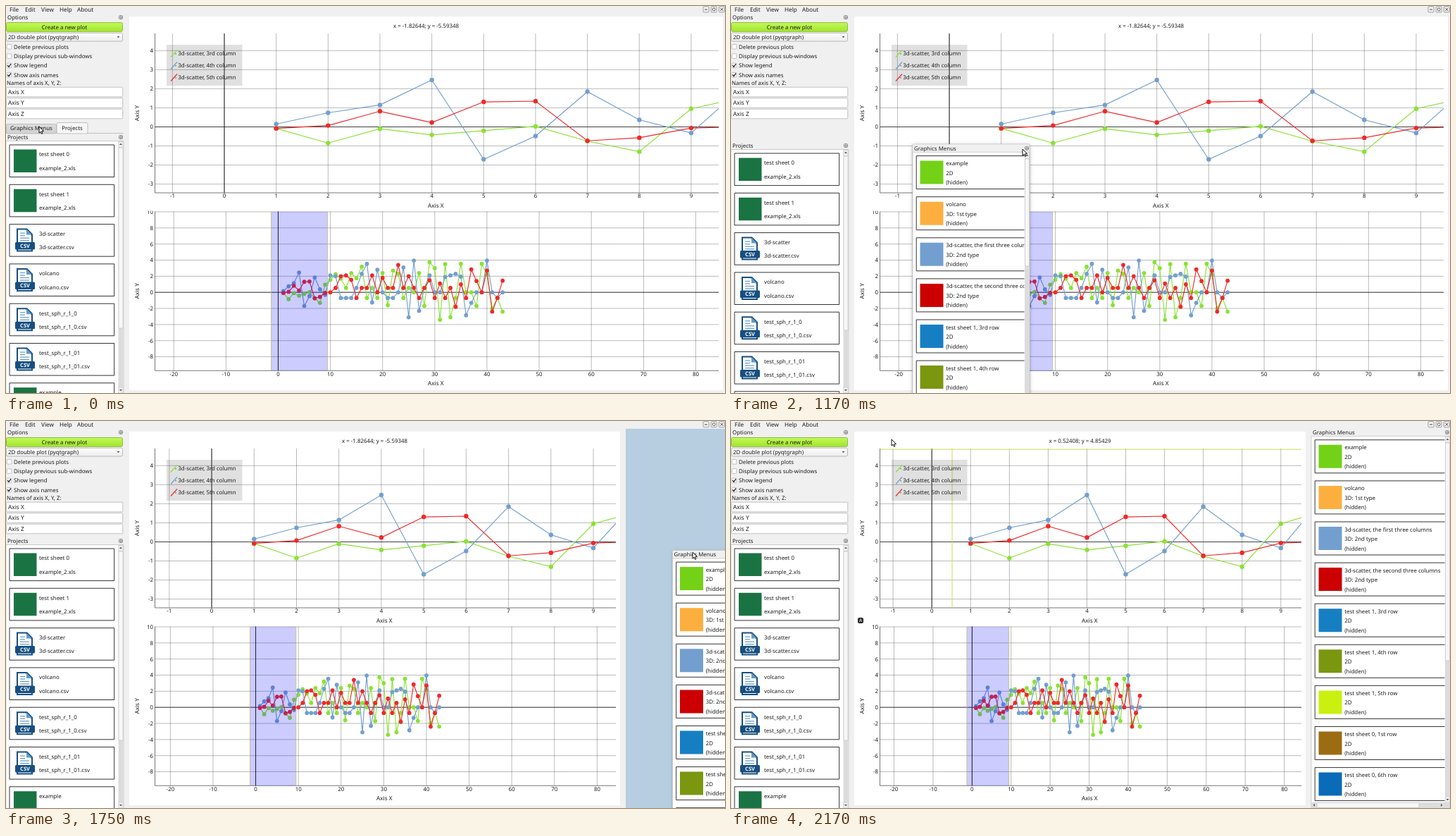
Recreate the animation shown at these times as an HTML page with a canvas. Size 1021 by 549 pixels, loop 2.26 s.

```html
<!DOCTYPE html>
<html lang="en">
<head>
<meta charset="utf-8">
<title>Plot docks</title>
<style>
  html, body { margin: 0; width: 100%; height: 100%; overflow: hidden; background: #f0f0f0; }
  canvas { display: block; width: 1021px; height: 549px; }
</style>
</head>
<body>
<canvas id="stage" width="1021" height="549"></canvas>
<script>
const WIDTH = 1021, HEIGHT = 549, LOOP = 2260, FPS = 12;
const ctx = document.getElementById('stage').getContext('2d');
const GREEN = '#8ae234', BLUE = '#729fcf', RED = '#ef2929', INK = '#1c1c1c', FACE = '#f0f0f0';

// Ticks (1/12 s) at which the interface switches state
const TAB_CLICK = 3, DETACH = 11, REPAINT = 18, DOCK = 24, HOVER = 25;

// Key poses: tick, then the values; linear in between
const CURSOR = [
  [4, 47, 171], [7, 46, 183], [8, 45, 186], [9, 45, 186], [10, 58, 189], [12, 180, 200], [14, 414, 203],
  [17, 965, 196], [19, 995, 193], [21, 975, 186], [22, 935, 175], [24, 600, 84], [25, 314, 40], [26, 228, 26]
];
const FLOATING = [[11, 18, 189], [14, 258, 196], [17, 870, 194], [19, 938, 191.5], [20, 952, 190], [22, 941, 177], [23, 896, 146]];
const AXES_END = [[18, 1012], [19, 1009], [20, 922], [22, 810]];
const PROJECTS_TOP = [[12, 186], [13, 198], [14, 198], [16, 170]];

function pose(keys, tick) {
  const next = keys.findIndex(k => k[0] >= tick);
  if (next < 0) return keys.at(-1).slice(1);
  if (next === 0) return keys[0].slice(1);
  const [t0, ...from] = keys[next - 1], [t1, ...to] = keys[next];
  return from.map((v, i) => v + (to[i] - v) * (tick - t0) / (t1 - t0));
}

// Small values share three levels; only the pronounced ones are spelled out
const lo = -.7, mid = 0, up = .55;
const SERIES = [
  { color: GREEN, name: '3rd', data: [
    -.08, -.85, -.1, -.42, -.2, .03, -.75, -1.3, .95, 1.55, 2.25, 1.7, up, 2.4, 1.75, 3.2, lo, up, lo, 2.4, -1.6, 2.7,
    2.3, lo, up, mid, 2.4, -1.7, 3.75, 3, -3.4, 3.5, -3.1, lo, 3.55, mid, mid, -1.7, 3.55, 2.2, -2, lo, -2.4] },
  { color: BLUE, name: '4th', data: [
    .15, .74, 1.15, 2.46, -1.7, -.48, 1.85, .37, -.32, 2.1, 2, lo, lo, lo, up, 2.3, 3.55, -1.25, 2.8, mid, lo, lo,
    mid, 3.1, -3.1, 3.95, -2.3, up, 2.1, mid, mid, 1.9, 2.1, 2.3, 1.95, -2.85, -1.3, mid, mid, 3.95, mid, lo, mid] },
  { color: RED, name: '5th', data: [
    -.08, .07, .82, .23, 1.31, 1.35, -.73, -.57, -.06, mid, up, 2, 2.1, 1.55, lo, up, up, 2.1, mid, 1.8, up, up,
    3.4, up, 2, up, lo, up, 1.5, lo, 1.1, lo, up, -1.8, 1, lo, 2.85, 1.4, mid, 2.7, -2.4, lo, 1.45] }
];

const PROJECTS = [
  ['test sheet 0', 'example_2.xls'], ['test sheet 1', 'example_2.xls'], ['3d-scatter', '3d-scatter.csv'],
  ['volcano', 'volcano.csv'], ['test_sph_r_1_0', 'test_sph_r_1_0.csv'],
  ['test_sph_r_1_01', 'test_sph_r_1_01.csv'], ['example', 'example.xls']
];
const MENUS = [
  ['example', '2D', '#73d216'], ['volcano', '3D: 1st type', '#fcaf3e'],
  ['3d-scatter, the first three columns', '3D: 2nd type', '#729fcf'],
  ['3d-scatter, the second three columns', '3D: 2nd type', '#cc0000'],
  ['test sheet 1, 3rd row', '2D', '#167fc3'], ['test sheet 1, 4th row', '2D', '#7b960f'],
  ['test sheet 1, 5th row', '2D', '#caf00f'], ['test sheet 0, 1st row', '2D', '#9c6c13'],
  ['test sheet 0, 6th row', '2D', '#0a6bb8']
];

function text(str, x, y, align = 'left', size = 7.9, color = INK) {
  ctx.font = `${size}px "Noto Sans", sans-serif`;
  ctx.textAlign = align;
  ctx.fillStyle = color;
  ctx.fillText(str, x, y + size * .36);
}

function box(x, y, w, h, fill, stroke, radius = 0, weight = 1) {
  ctx.beginPath();
  ctx.roundRect(x, y, w, h, radius);
  if (fill) { ctx.fillStyle = fill; ctx.fill(); }
  if (stroke) { ctx.strokeStyle = stroke; ctx.lineWidth = weight; ctx.stroke(); }
}

function path(points, stroke, weight = 1, fill) {
  ctx.beginPath();
  points.forEach(([x, y]) => ctx.lineTo(x, y));
  if (fill) { ctx.closePath(); ctx.fillStyle = fill; ctx.fill(); }
  if (stroke) { ctx.strokeStyle = stroke; ctx.lineWidth = weight; ctx.stroke(); }
}

const line = (x0, y0, x1, y1, color, weight) => path([[x0, y0], [x1, y1]], color, weight);

function clipped(x, y, w, h, draw) {
  ctx.save();
  ctx.beginPath();
  ctx.rect(x, y, w, h);
  ctx.clip();
  draw();
  ctx.restore();
}

function shade(y0, y1, top, bottom) {
  const g = ctx.createLinearGradient(0, y0, 0, y1);
  g.addColorStop(0, top);
  g.addColorStop(1, bottom);
  return g;
}

function arrow(x, y, angle) {
  ctx.save();
  ctx.translate(x, y);
  ctx.rotate(angle);
  path([[-2, -1], [2, -1], [0, 1.3]], null, 0, '#555');
  ctx.restore();
}

function floatButton(x, y) {
  box(x - 2.5, y - 2.5, 5, 5, '#f4f4f4', '#777', 1, .8);
  box(x - 1, y - 1, 2.2, 2.2, null, '#555', 0, .7);
}

function scrollBar(x, top, bottom, handleEnd) {
  box(x, top, 7, bottom - top, '#dcdcdc');
  box(x + .5, top + .5, 6, 8, FACE, '#c8c8c8', 0, .6);
  box(x + .5, top + 9, 6, handleEnd - top - 9, '#f7f7f7', '#bdbdbd', 1, .6);
  arrow(x + 3.5, top + 4, Math.PI);
  if (bottom <= HEIGHT) {
    box(x + .5, bottom - 8, 6, 8, FACE, '#c8c8c8', 0, .6);
    arrow(x + 3.5, bottom - 4, 0);
  }
}

function csvIcon(x, y) {
  const navy = '#164f80', sky = '#5f9ac8';
  const sheet = (inset, color) => {
    const l = x + 5 + inset, r = x + 28 - inset, t = y + 6 + inset, b = y + 39 - inset;
    path([[l, t], [r - 8, t], [r, t + 8], [r, b], [l, b]], null, 0, color);
  };
  sheet(0, navy);
  sheet(2, '#fff');
  path([[x + 19, y + 7], [x + 19, y + 15], [x + 27, y + 15]], null, 0, sky);
  for (let i = 0; i < 4; i++) box(x + 10, y + 12 + i * 3.5, i < 2 ? 7 : 13, 1.2, sky);
  box(x + 3, y + 25.5, 28, 10.5, navy, null, 1.5);
  ctx.font = 'bold 7.5px "Noto Sans", sans-serif';
  ctx.textAlign = 'center';
  ctx.fillStyle = '#fff';
  ctx.fillText('CSV', x + 17, y + 33.4);
}

function projectList(header) {
  text('Projects', 2, header);
  floatButton(163, header);
  box(0, header + 5.5, 167, HEIGHT, '#fff', '#bbb', 0, .7);
  PROJECTS.forEach(([title, file], i) => {
    const y = header + 11 + i * 56.3;
    box(5, y, 148.7, 45.6, '#fff', INK, 0, .9);
    if (file.endsWith('.xls')) box(11, y + 6.5, 32.5, 32.5, '#1a7343');
    else csvIcon(10, y);
    text(title, 47, y + 13.5);
    text(file, 47, y + 33);
  });
  scrollBar(159.5, header + 6, HEIGHT, 457 + (header - 186) * .25);
}

function menuList(x, header, w, bottom, handleEnd) {
  text('Graphics Menus', x + 2, header);
  floatButton(x + w - 4, header);
  box(x, header + 5.5, w, bottom - header - 5.5, '#fff', '#bbb', 0, .7);
  clipped(x, header + 6, w - 7.5, bottom - header - 14, () => {
    MENUS.forEach(([title, kind, color], i) => {
      const y = header + 10.8 + i * 58.1;
      box(x + 5.2, y, 215, 47, '#fff', INK, 0, .9);
      box(x + 10.5, y + 7, 33, 33, color);
      [title, kind, '(hidden)'].forEach((s, row) => text(s, x + 47.2, y + 10.7 + row * 13.5));
    });
  });
  scrollBar(x + w - 7, header + 6, bottom - 8, handleEnd);
  box(x, bottom - 8, w, 8, '#dcdcdc');
  box(x + 8, bottom - 7.5, w - 52, 7, '#f7f7f7', '#bdbdbd', 1, .6);
  arrow(x + 4, bottom - 4, Math.PI / 2);
  arrow(x + w - 12, bottom - 4, -Math.PI / 2);
}

function tabs(menusActive) {
  const tab = (label, x, w, on) => {
    const top = on ? 165.5 : 167.5;
    box(x, top, w, 181 - top, on ? '#f7f7f7' : shade(167, 181, '#dedede', '#d0d0d0'), '#b4b4b4', 2, .8);
    text(label, x + w / 2, 173, 'center');
  };
  line(0, 180.5, 167, 180.5, '#b4b4b4', .8);
  tab('Graphics Menus', .5, 71, menusActive);
  tab('Projects', 72, 44, !menusActive);
}

function options() {
  Object.entries({ File: 5, Edit: 27, View: 50, Help: 76, About: 101 })
    .forEach(([label, x]) => text(label, x, 5, 'left', 8.2));
  for (let i = 0; i < 3; i++) {
    const x = 990 + i * 11.2;
    box(x, .8, 8, 8, '#f4f4f4', '#888', 1, .8);
    if (i === 0) line(x + 2, 5, x + 6, 5, '#444');
    if (i === 1) box(x + 2.2, 3, 3.6, 3.6, null, '#444', 1, .8);
    if (i === 2) {
      line(x + 2, 2.8, x + 6, 6.8, '#444');
      line(x + 6, 2.8, x + 2, 6.8, '#444');
    }
  }
  text('Options', 2, 16);
  floatButton(163, 16);
  box(.5, 23.5, 165, 12.8, shade(23, 36, '#c3f95c', '#a3e62c'), '#7fae2c', 2, .8);
  text('Create a new plot', 83, 30, 'center');
  box(.5, 38.3, 165, 11.8, shade(38, 50, '#fff', '#ececec'), '#aaa', 2, .8);
  text('2D double plot (pyqtgraph)', 3, 44);
  arrow(159.5, 44, 0);
  ['Delete previous plots', 'Display previous sub-windows', 'Show legend', 'Show axis names'].forEach((s, i) => {
    const y = 58 + i * 13.3;
    box(1.2, y - 3.5, 6.6, 6.6, '#fff', '#aaa', 1, .7);
    if (i > 1) path([[2.3, y - .4], [4, y + 1.8], [7, y - 2.6]], '#222', 1.3);
    text(s, 11, y);
  });
  text('Names of axis X, Y, Z:', 1, 109);
  ['X', 'Y', 'Z'].forEach((s, i) => {
    const y = 122 + i * 15.5;
    box(.5, y - 6.8, 165.3, 13.6, '#fff', '#b4b4b4', 1, .8);
    text('Axis ' + s, 3, y, 'left', 8.3);
  });
}

function plot(p, right) {
  const left = 211.5, w = right - left;
  const px = v => left + w * (p.origin + v / p.span);
  const py = v => p.zero - v * p.unit;
  const vline = (v, color, weight) => line(px(v), p.top, px(v), p.bottom, color, weight);
  const hline = (v, color, weight) => line(left, py(v), right, py(v), color, weight);

  for (let v = p.xMin; v <= p.xMax; v += p.xStep) {
    vline(v, 'rgba(0,0,0,.36)', .75);
    text(v, px(v), p.bottom + 4.5, 'center');
  }
  for (let v = p.yMin; v <= p.yMax; v += p.yStep) {
    hline(v, 'rgba(0,0,0,.36)', .75);
    text(v, 209, py(v), 'right');
  }
  path([[left, p.top], [left, p.bottom], [right, p.bottom]], '#555', .8);
  vline(0, '#111', .9);
  hline(0, '#222', .8);

  clipped(left, p.top, w, p.bottom - p.top, () => {
    for (const { color, data } of SERIES) {
      const points = data.map((v, i) => [px(i + 1), py(v)]);
      path(points, color, 1.15);
      ctx.fillStyle = color;
      for (const [x, y] of points) {
        ctx.beginPath();
        ctx.arc(x, y, p.dot, 0, 7);
        ctx.fill();
      }
    }
    if (p.region) {
      const [a, b] = p.region.map(px);
      box(a, p.top, b - a, p.bottom - p.top, 'rgba(0,0,255,.2)');
      p.region.forEach(v => vline(v, '#b9bb78', .8));
    }
    if (p.cross) {
      vline(p.cross[0], '#c9d64a', .9);
      hline(p.cross[1], '#c9d64a', .9);
    }
  });

  text('Axis X', left + w / 2 - 1.5, p.bottom + 17.7, 'center', 8.2);
  ctx.save();
  ctx.translate(186, (p.top + p.bottom) / 2);
  ctx.rotate(-Math.PI / 2);
  text('Axis Y', 0, 0, 'center', 8.2);
  ctx.restore();
}

function plots(tick, right) {
  const hover = tick >= HOVER;
  box(175, 15, right + 6 - 175, 530, '#fff');
  plot({ top: 291.5, bottom: 517.3, zero: 406.2, unit: 11.42, origin: .2186, span: 108, dot: 2.9,
         xMin: -20, xMax: 80, xStep: 10, yMin: -8, yMax: 10, yStep: 2, region: [-1.33, 9.45] }, right);
  if (tick < REPAINT) box(195, 284, 16, 6.7, '#fff');
  plot({ top: 39, bottom: 265, zero: 171.5, unit: 27.05, origin: .1231, span: 10.868, dot: 3.2,
         xMin: -1, xMax: 9, xStep: 1, yMin: -3, yMax: 4, yStep: 1, cross: hover && [.52408, 4.85429] }, right);
  text(hover ? 'x = 0.52408; y = 4.85429' : 'x = -1.82644; y = -5.59348', (right + 181) / 2, 28, 'center');

  box(228, 55, 107.5, 58, 'rgba(100,100,100,.2)');
  SERIES.forEach(({ color, name }, i) => {
    const y = 67.5 + i * 17;
    line(234, y + 5, 243, y - 5, color, 1.2);
    text(`- 3d-scatter, ${name} column`, 239.7, y);
  });
  if (hover) {
    box(180.5, 279.5, 7, 7, '#333', '#222', 1.5);
    text('A', 184, 283, 'center', 6.5, '#fff');
  }
}

function floatingWindow(x, y) {
  ctx.save();
  ctx.shadowColor = 'rgba(0,0,0,.35)';
  ctx.shadowBlur = 5;
  ctx.shadowOffsetY = 1;
  box(x, y, 166, 380, FACE);
  ctx.restore();
  box(x, y, 166, 380, null, '#c4c4c4', 0, .6);
  menuList(x, y + 5.8, 166, y + 380, y + 173);
}

function cursor(x, y) {
  ctx.save();
  ctx.translate(x, y);
  path([[0, 0], [0, 9.2], [2.1, 7.3], [3.6, 10.4], [5, 9.7], [3.6, 6.8], [6.5, 6.6]], null, 0, '#fff');
  ctx.closePath();
  ctx.strokeStyle = '#111';
  ctx.lineWidth = 1;
  ctx.stroke();
  ctx.restore();
}

function draw(tick) {
  const [right] = pose(AXES_END, tick), [header] = pose(PROJECTS_TOP, tick);
  const menusTab = tick >= TAB_CLICK && tick < DETACH;
  ctx.textRendering = 'geometricPrecision';
  box(0, 0, WIDTH, HEIGHT, FACE);
  options();
  if (tick < DETACH) tabs(menusTab);
  if (menusTab) menuList(0, header, 166.5, HEIGHT, 354);
  else projectList(header);
  plots(tick, right);
  if (right < 1009) box(right + 14, 11, WIDTH, HEIGHT, '#b7cee1');
  if (tick >= DOCK) {
    box(823, 10.5, 198, 540, FACE);
    menuList(824, 16, 197, HEIGHT, 340);
  } else if (tick >= DETACH) {
    floatingWindow(...pose(FLOATING, tick));
  }
  cursor(...pose(CURSOR, tick));
}

let shown;
function play() {
  // changes fall on times rounded to 10 ms, up to 3.4 ms before the exact tick
  const tick = Math.floor((performance.now() % LOOP + 3.4) * FPS / 1000);
  if (tick !== shown) draw(shown = tick);
  requestAnimationFrame(play);
}
play();
</script>
</body>
</html>
```
